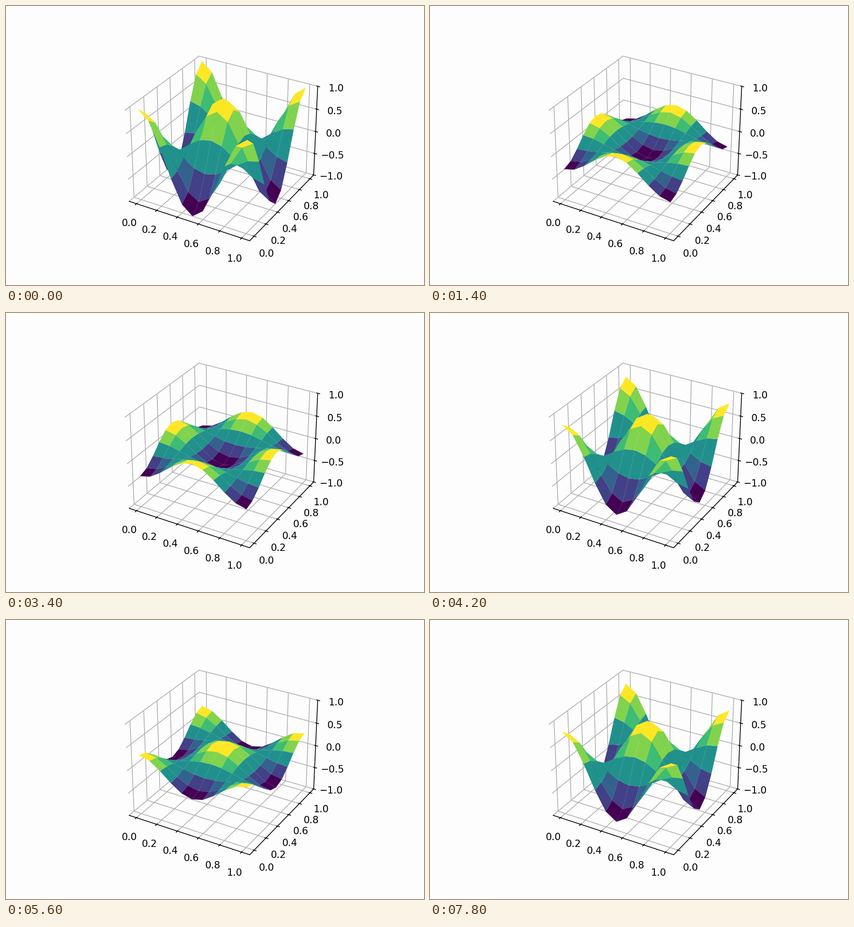
These frames come from a looping animation (917x611 px, 8000 ms). A matplotlib script:

```python
import numpy as np
import matplotlib.pyplot as plt
from matplotlib.animation import FuncAnimation

W, H, DPI = 917, 611, 152.75
FRAMES, INTERVAL = 40, 200
PERIOD = 10  # frames per oscillation
PAPER = "#fdfdfd"
PAD = 0.05 + 1.1 / 48

# the tiny offset keeps the pixel size from rounding down
fig = plt.figure(figsize=(W / DPI + 1e-9, H / DPI + 1e-9), dpi=DPI,
                 facecolor=PAPER)
ax = fig.add_subplot(projection="3d", facecolor=PAPER)

ax.set_xlim(-PAD, 1 + PAD)
ax.set_ylim(-PAD, 1 + PAD)
ax.set_zlim(-1, 1)
ax.set_xticks(np.linspace(0, 1, 6))
ax.set_yticks(np.linspace(0, 1, 6))
ax.set_zticks(np.linspace(-1, 1, 5))
for axis in (ax.xaxis, ax.yaxis, ax.zaxis):
    axis.set_pane_color((1, 1, 1, 0))

grid = np.linspace(0, 1, 11)
X, Y = np.meshgrid(grid, grid)
MODE = np.cos(2 * np.pi * X) * np.cos(2 * np.pi * Y)


def draw(i):
    for surface in list(ax.collections):
        surface.remove()
    z = MODE * np.cos(2 * np.pi * i / PERIOD)
    return [ax.plot_surface(X, Y, z, cmap="viridis")]


anim = FuncAnimation(fig, draw, frames=FRAMES, init_func=lambda: draw(0),
                     interval=INTERVAL, repeat=True, repeat_delay=0)
plt.show()
```
